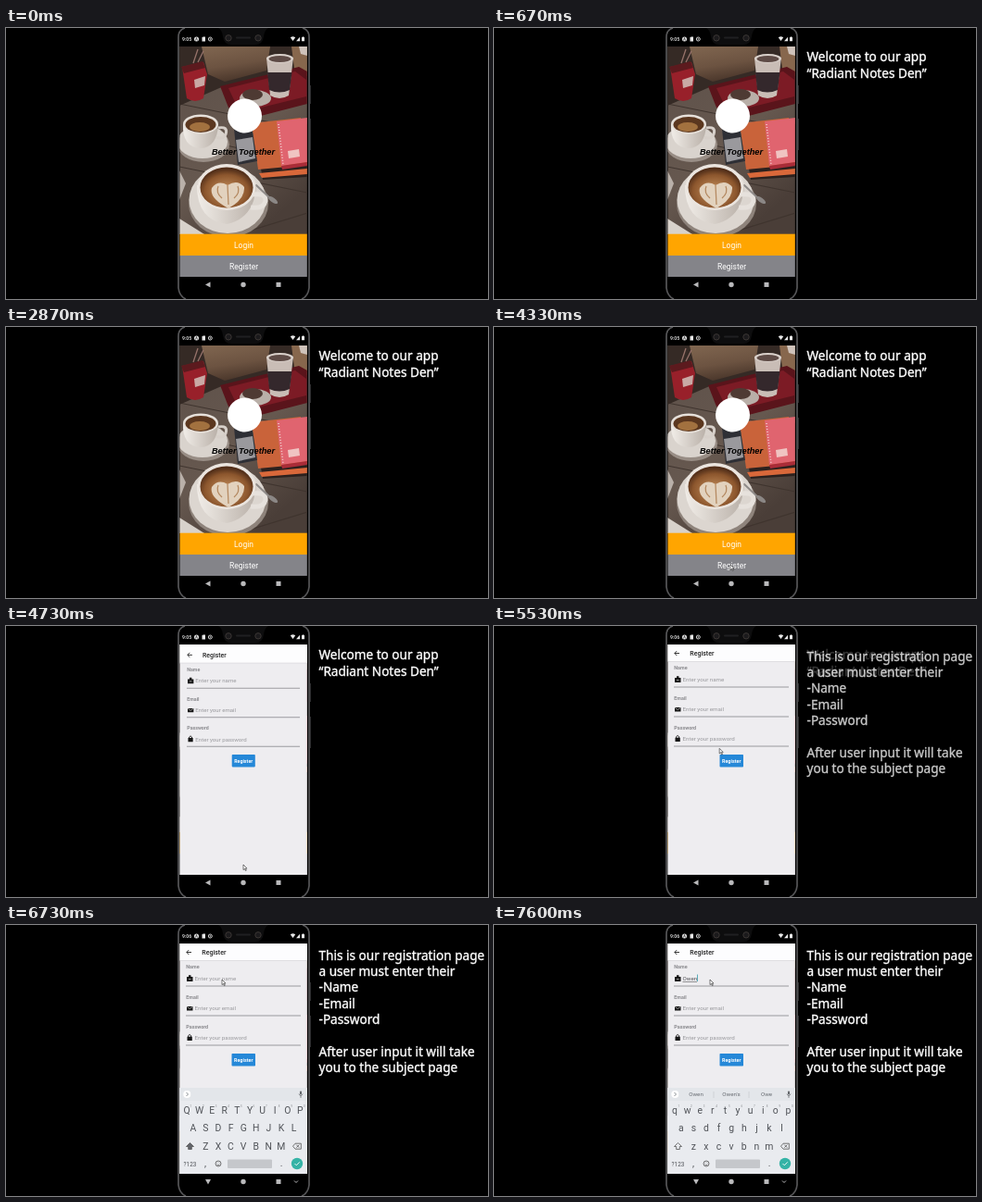
An HTML page that plays this animation: 520x293 px, repeating every 8000 ms.

```html
<!DOCTYPE html>
<html lang="en">
<head>
<meta charset="utf-8">
<title>Study app walkthrough</title>
<style>
html, body { margin: 0; width: 100%; height: 100%; overflow: hidden; background: #000; }
svg { display: block; width: 100vw; height: 100vh; font-family: Roboto, sans-serif; }
.mid { text-anchor: middle; }
.caption { font: 13.6px "Noto Sans", "Open Sans", sans-serif; fill: #fff; stroke: #fff; stroke-width: .35px; }
.label { font-size: 5.4px; font-weight: 700; fill: #8a8a8e; }
.field { font-size: 6.2px; fill: #98989c; }
.key { font-size: 10.4px; fill: #505358; text-anchor: middle; }
.hint { font-size: 3px; fill: #85888c; }
.tip { font-size: 6.2px; fill: #666a70; text-anchor: middle; }
</style>
</head>
<body>
<svg viewBox="0 0 520 293" preserveAspectRatio="none">
  <defs>
    <clipPath id="screen"><rect x="187.500" y="20" width="137.300" height="249"/></clipPath>
    <clipPath id="photoClip"><rect x="187.500" y="20" width="137.300" height="203"/></clipPath>
    <clipPath id="imeClip"><rect x="187.500" y="170" width="137.300" height="116"/></clipPath>
    <linearGradient id="table" x1="0" y1="0" x2="0.6" y2="1">
      <stop offset="0" stop-color="#5d5049"/><stop offset="0.6" stop-color="#66584f"/><stop offset="1" stop-color="#4a3e38"/>
    </linearGradient>
    <linearGradient id="wall" x1="0" x2="0.3" y2="1">
      <stop offset="0" stop-color="#806650"/><stop offset="0.6" stop-color="#6c5341"/><stop offset="1" stop-color="#4c382c"/>
    </linearGradient>
    <radialGradient id="coffee" cx=".5" cy=".6" r=".55">
      <stop offset=".3" stop-color="#b07b4c"/><stop offset=".75" stop-color="#8c562d"/><stop offset="1" stop-color="#54301a"/>
    </radialGradient>
    <linearGradient id="china" x1="0" x2="1">
      <stop offset="0" stop-color="#f1ede8"/><stop offset="1" stop-color="#b9b0a8"/>
    </linearGradient>
  </defs>
  <rect width="520" height="293"/>
  <path d="M193 0Q186 2 186 10V281Q187 290 194 293M320 0Q327 2 327 10V281Q326 290 319 293" fill="none" stroke="#565658" stroke-width="1.700"/>
  <path d="M328.500 62V82M328.500 98V132" stroke="#2c2c2e"/>

  <g id="home" clip-path="url(#screen)">
    <g clip-path="url(#photoClip)">
      <rect x="187" y="20" width="138" height="203" fill="url(#table)"/>
      <path d="M187 82L325 110M187 150L325 178M187 116L325 146M250 223L325 200" stroke="#3f342e" stroke-width="1.200"/>
      <path d="M187 20H325V50L237 62L187 84Z" fill="#352a25"/>
      <path d="M211 20H285L281 46L236 58L218 50Z" fill="url(#wall)"/>
      <path d="M308 20H325V52L311 44Z" fill="#87674d"/>
      <path d="M316 20H325V30L318 28Z" fill="#cfc3bb"/>
      <path d="M190 42L213 37L217 50L213 76Q204 82 195 76Z" fill="#98202a"/>
      <path d="M189 42L212 36L215 43L192 49Z" fill="#5c1a1e"/>
      <path d="M203 56L215 52L214 62L204 65Z" fill="#c9a9a5"/>
      <path d="M202 38L207 23M207 37L213 25" stroke="#96726a" stroke-width="1.300"/>
      <path d="M231 63L316 42L325 47V82L267 97L240 86Z" fill="#5a141b"/>
      <path d="M240 65L312 47L324 56V74L267 88L247 80Z" fill="#7c1b25"/>
      <ellipse cx="269" cy="76" rx="17" ry="9" fill="#b9afa8"/>
      <ellipse cx="266" cy="72" rx="11" ry="6" fill="#4e3a33"/>
      <path d="M281 32H310L305 73Q295 79 285 73Z" fill="#c9bdb6"/>
      <path d="M282 48H308.500L306 67Q295 72 284 67Z" fill="#34282c"/>
      <ellipse cx="295.500" cy="33" rx="14.500" ry="5" fill="#d9d0ca"/>
      <ellipse cx="295.500" cy="33.500" rx="12" ry="3.500" fill="#5e4b46"/>
      <path d="M268 110L318 101L325 104V161L277 164Z" fill="#2c211e"/>
      <path d="M265 103L318 97L325 148L272 153Z" fill="#c9633a"/>
      <path d="M273 157L325 152V158L276 162Z" fill="#d9683a"/>
      <path d="M292 101L325 97V145L297 149Z" fill="#e0646f"/>
      <path d="M297 149L325 145V149L298 153Z" fill="#a92c38"/>
      <path d="M304 133L316 131L317 139L305 141Z" fill="#f0c4c2"/>
      <path d="M294 104L299 148" stroke="#f3d4d0" stroke-width="1.500" stroke-dasharray="1 2"/>
      <path d="M246 109L265 107L271 144L250 148Z" fill="#2e2f35"/>
      <path d="M248 121L266 118L269 141L251 145Z" fill="#9a999d"/>
      <ellipse cx="213" cy="126" rx="28" ry="19" fill="#988d85"/>
      <ellipse cx="212" cy="123" rx="27" ry="18" fill="#d9d3cd"/>
      <path d="M191 104Q190 129 210 130Q228 129 229 104Z" fill="url(#china)"/>
      <ellipse cx="210" cy="104" rx="19" ry="10.500" fill="#e6e0da"/>
      <ellipse cx="210" cy="104.500" rx="16.500" ry="8.500" fill="#5b371f"/>
      <ellipse cx="209" cy="107" rx="11" ry="5" fill="#a2713f"/>
      <path d="M229 108Q240 106 237 115Q234 121 227 118" fill="none" stroke="#d6cfc9" stroke-width="3"/>
      <path d="M187 154L194 168L187 186Z" fill="#b9b0a9"/>
      <path d="M187 206L214 223H187Z" fill="#d8d2cb"/>
      <ellipse cx="240" cy="190" rx="43" ry="36" fill="#8e837b"/>
      <ellipse cx="239" cy="186" rx="41.500" ry="36" fill="#dcd6d0"/>
      <path d="M206 170Q206 208 238 212Q268 206 270 170Z" fill="url(#china)"/>
      <path d="M266 180Q281 178 280 187Q278 196 264 194" fill="none" stroke="#e6e1dc" stroke-width="5"/>
      <path d="M270 170L288 187" stroke="#8f8b89" stroke-width="2" stroke-linecap="round"/>
      <ellipse cx="288" cy="186" rx="6" ry="2.500" transform="rotate(35 288 186)" fill="#8b8785"/>
      <ellipse cx="238" cy="172" rx="31.500" ry="25" fill="#ebe5df"/>
      <ellipse cx="238" cy="172.500" rx="28.500" ry="22" fill="url(#coffee)"/>
      <path d="M240 195Q219 184 222 173Q229 164 239 170Q250 163 257 172Q258 185 240 195Z" fill="#e2d2be"/>
      <path d="M240 191L239 170M233 184Q226 178 229 171M246 184Q253 178 250 171" fill="none" stroke="#b58a62" stroke-width="1.300"/>
    </g>
    <circle cx="257.500" cy="95" r="18.500" fill="#fff"/>
    <text x="256" y="136.500" class="mid" font-family="Liberation Sans, sans-serif" font-size="9.200" font-weight="700" font-style="italic">Better Together</text>
    <rect x="187" y="222.700" width="138" height="23.500" fill="#ffa500"/>
    <rect x="187" y="246" width="138" height="23" fill="#848489"/>
    <g class="mid" fill="#fff" font-size="8.500">
      <text x="256.500" y="238">Login</text>
      <text x="256.500" y="261">Register</text>
    </g>
  </g>

  <g clip-path="url(#screen)">
    <g id="page">
      <rect x="185" y="18" width="143" height="253" fill="#eeedf0"/>
      <rect x="185" y="18" width="143" height="20" fill="#fdfdfe"/>
      <path d="M185 38.500H328" stroke="#d9d8dc" stroke-width=".7"/>
      <path d="M200 29.500H195M197.300 27L194.800 29.500L197.300 32" fill="none" stroke="#222" stroke-width=".9"/>
      <text x="211.300" y="32" font-size="7" font-weight="500" fill="#222">Register</text>
      <g id="form"></g>
      <path d="M194 66H318M194 98H318M194 130H318" stroke="#85858a" stroke-width=".8"/>
      <path d="M195 56H201.500V61H195ZM197 56V54.300H199.500V56M195 88H201.500V92.500H195ZM195.500 120.700H200.800V125H195.500Z" fill="#151515"/>
      <path d="M195.200 88.300L198.200 90.500L201.300 88.300M197 58.500H199.500" fill="none" stroke="#eee" stroke-width=".6"/>
      <path d="M196.700 121V119.600Q198.100 117.300 199.600 119.600V121" fill="none" stroke="#151515" stroke-width=".9"/>
      <rect x="243.500" y="139" width="25.500" height="13.500" rx=".8" fill="#2588d8"/>
      <text x="256.200" y="147.700" class="mid" font-size="5.400" font-weight="700" fill="#fff">Register</text>
      <rect id="mark" x="203.500" y="61" height=".6" fill="#555"/>
      <rect id="caret" y="53.500" width=".9" height="7.500" fill="#4ba6b5"/>
    </g>
    <rect id="gap" x="187" y="176" width="138" height="93" fill="#fbfbfc"/>
  </g>

  <g id="status" fill="#e8e8e8">
    <rect x="188" y="4" width="136" height="16" fill="#000"/>
    <path d="M229 0Q233 2 234 9Q235 18 243 18H269Q277 18 278 9Q279 2 283 0Z" fill="#0d0d0e"/>
    <g fill="#1b1a1c" stroke="#3b3634"><circle cx="240" cy="10.800" r="3.200"/><circle cx="272" cy="10.800" r="3.200"/></g>
    <rect x="248" y="9.500" width="16" height="2" rx="1" fill="#202022"/>
    <text id="clock" x="190" y="14" font-size="5.200" font-weight="500"></text>
    <circle cx="205.500" cy="12" r="2.500"/><path d="M204.500 13.500L205.500 10.500L206.500 13.500" fill="none" stroke="#000" stroke-width=".6"/>
    <path d="M211.500 10.500L212.500 9.500H215V14.500H211.500Z"/>
    <circle cx="220.300" cy="12" r="2" fill="none" stroke="#e8e8e8" stroke-width=".9"/><circle cx="220.300" cy="12" r=".7"/>
    <path d="M306.800 10.200Q309.500 8.200 312.200 10.200L309.500 14ZM313 14.300H317V9.700ZM319 10H320V9.300H321V10H322V14.300H319Z"/>
  </g>
  <g id="nav" fill="#b9b9bb">
    <path id="back"/>
    <circle cx="256" cy="277.500" r="2.700"/><rect x="291.500" y="275" width="5" height="5"/>
    <path id="chev" d="M311 276.500L313 278.500L315 276.500" fill="none" stroke="#b9b9bb"/>
  </g>

  <g clip-path="url(#imeClip)">
    <g id="ime">
      <rect x="187" y="176" width="138" height="93" fill="#e9ebef"/>
      <rect x="187" y="176" width="138" height="14" fill="#e3e6ea"/>
      <circle cx="195.300" cy="183" r="4" fill="#fff"/>
      <path d="M194.500 181L196.500 183L194.500 185" fill="none" stroke="#6b7076" stroke-width=".8"/>
      <path id="bars" d="M237 180V187M275 180V187" stroke="#c5c8cc" stroke-width=".6"/>
      <rect x="317" y="179.500" width="2" height="4" rx="1" fill="#606469"/>
      <path d="M316 182.500Q318 187 320 182.500M318 185V187" fill="none" stroke="#606469" stroke-width=".7"/>
      <path id="shift" d="M198.500 235.500L202.500 239.500H200.300V242.500H196.700V239.500H194.500Z" stroke="#555" stroke-width=".8"/>
      <path d="M309.500 239.200L312 236.200H318.300V242.200H312ZM313.300 237.700L316.300 240.700M316.300 237.700L313.300 240.700" fill="none" stroke="#555" stroke-width=".8"/>
      <text x="198.500" y="260.500" class="mid" font-size="6.400" fill="#505358">?123</text>
      <text x="215" y="261" class="key">,</text><text x="297" y="261" class="key">.</text>
      <circle cx="229" cy="258" r="3" fill="none" stroke="#555" stroke-width=".8"/>
      <path d="M227.500 259Q229 260.500 230.500 259M228 256.700V257.300M230 256.700V257.300" fill="none" stroke="#555" stroke-width=".7"/>
      <rect x="239" y="253.500" width="48" height="9.500" rx="1" fill="#c5c7cb"/>
      <circle cx="314" cy="258" r="6.200" fill="#35b3a6"/>
      <path d="M311.500 258L313.300 259.800L316.800 256.300" fill="none" stroke="#fff" stroke-width=".9"/>
    </g>
  </g>

  <path id="mouse" d="M0 0V5.600L1.400 4.400L2.400 6.600L3.300 6.200L2.300 4.100H4Z" fill="#fff" stroke="#222" stroke-width=".6"/>
  <g id="intro" class="caption"></g>
  <g id="guide" class="caption"></g>
</svg>
<script>
const LOOP = 8000;
const $ = id => document.getElementById(id);
const set = (id, attrs) => { for (const k in attrs) $(id).setAttribute(k, attrs[k]); };
const show = (id, on) => set(id, { visibility: on ? 'visible' : 'hidden' });

function text(parent, x, y, str, cls) {
  const el = document.createElementNS('http://www.w3.org/2000/svg', 'text');
  el.setAttribute('x', x);
  el.setAttribute('y', y);
  if (cls) el.setAttribute('class', cls);
  el.textContent = str;
  $(parent).append(el);
  return el;
}

// Right-hand captions
['Welcome to our app', '“Radiant Notes Den”'].forEach((s, i) => text('intro', 337.5, 36.3 + i * 17.7, s));
['This is our registration page', 'a user must enter their', '-Name', '-Email', '-Password', '',
  'After user input it will take', 'you to the subject page'].forEach((s, i) => text('guide', 337.5, 37.7 + i * 17.35, s));

// Form fields
const fields = ['Name', 'Email', 'Password'].map((s, i) => {
  text('form', 194.3, 47.4 + i * 32.2, s, 'label');
  return text('form', 203.5, 59.8 + i * 32.2, 'Enter your ' + s.toLowerCase(), 'field');
});

// Keyboard letters
const keys = [];
[['qwertyuiop', 195], ['asdfghjkl', 201.8], ['zxcvbnm', 215.3]].forEach(([row, x0], r) =>
  [...row].forEach((ch, i) => {
    const x = x0 + i * 13.6, y = 203.5 + r * 19.5;
    keys.push(text('ime', x, y, ch, 'key'));
    if (!r) text('ime', x + 3.5, y - 7, (i + 1) % 10, 'hint');
  }));
const tips = [218, 256, 294].map(x => text('ime', x, 185.2, '', 'tip'));

// time, typed text, suggestions
const TYPED = [
  [0, '', ['', '', '']],
  [7070, 'O', ['O', 'Oh', 'On']],
  [7270, 'Ow', ['Ow', 'Own', 'Owl']],
  [7400, 'Owe', ['Owe', 'Owed', 'Owes']],
  [7600, 'Owen', ['Owen', "Owen's", 'Owe']]
];
// time, then the values to interpolate
const MOUSE = [[3660, 316, 155], [3870, 299, 179], [4070, 274, 223], [4200, 260, 248], [4330, 255, 257],
  [4670, 255, 257], [4730, 256, 258], [5100, 256, 258], [5340, 252, 208], [5600, 240, 105], [5870, 233, 59]];
const PAGE = [[4600, 0.85, 0], [4670, 0.955, 0.75], [4730, 0.984, 1], [4800, 0.993, 1], [4930, 1, 1]];
const IME = [[6130, 20, 0], [6200, 19, 0.4], [6270, 17, 0.83], [6340, 9, 0.95], [6400, 3, 1], [6470, 0, 1]];

const ramp = (t, a, b) => Math.min(1, Math.max(0, (t - a) / (b - a)));

function track(table, t) {
  let i = 0;
  while (i < table.length - 2 && t >= table[i + 1][0]) i++;
  const a = table[i], b = table[i + 1], k = ramp(t, a[0], b[0]);
  return a.slice(1).map((v, n) => v + (b[n + 1] - v) * k);
}

let lastEntry;
function type(entry) {
  if (entry === lastEntry) return;
  lastEntry = entry;
  const [, word, words] = entry, name = fields[0];
  name.textContent = word || 'Enter your name';
  name.style.fill = word ? '#55555a' : '';
  const w = word ? name.getComputedTextLength() : 0;
  set('mark', { width: w });
  set('caret', { x: 203.4 + w });
  keys.forEach(k => k.textContent = word ? k.textContent.toLowerCase() : k.textContent.toUpperCase());
  tips.forEach((el, i) => el.textContent = words[i]);
  set('shift', { fill: word ? 'none' : '#62656a' });
  show('bars', word);
}

function draw(t) {
  const swap = ramp(t, 5010, 5670);
  set('intro', { opacity: ramp(t, 30, 670) * (1 - swap) });
  set('guide', { opacity: swap });
  $('clock').textContent = t < 5070 ? '9:05' : '9:06';

  const [scale, alpha] = track(PAGE, t);
  set('page', { opacity: t < 4665 ? 0 : alpha, transform: `translate(256.5 145) scale(${scale}) translate(-256.5 -145)` });

  const [dy, fade] = track(IME, t);
  set('ime', { opacity: fade, transform: `translate(0 ${dy})` });
  show('gap', t >= 6130);
  const open = t >= 6400;
  show('chev', open);
  set('back', { d: open ? 'M215 275H221L218 280.5Z' : 'M215 277.5L220.5 274.5V280.5Z' });

  type(TYPED.filter(e => t >= e[0]).pop());
  set('caret', { opacity: t < 6130 ? 0 : t < 7070 ? 1 - ramp(t, 6640, 6730) : 1 });

  const [mx, my] = track(MOUSE, t);
  show('mouse', t >= 3665);
  set('mouse', { transform: `translate(${mx} ${my})` });
}

const start = performance.now();
function tick() {
  draw((performance.now() - start) % LOOP);
  requestAnimationFrame(tick);
}
tick();
</script>
</body>
</html>
```
